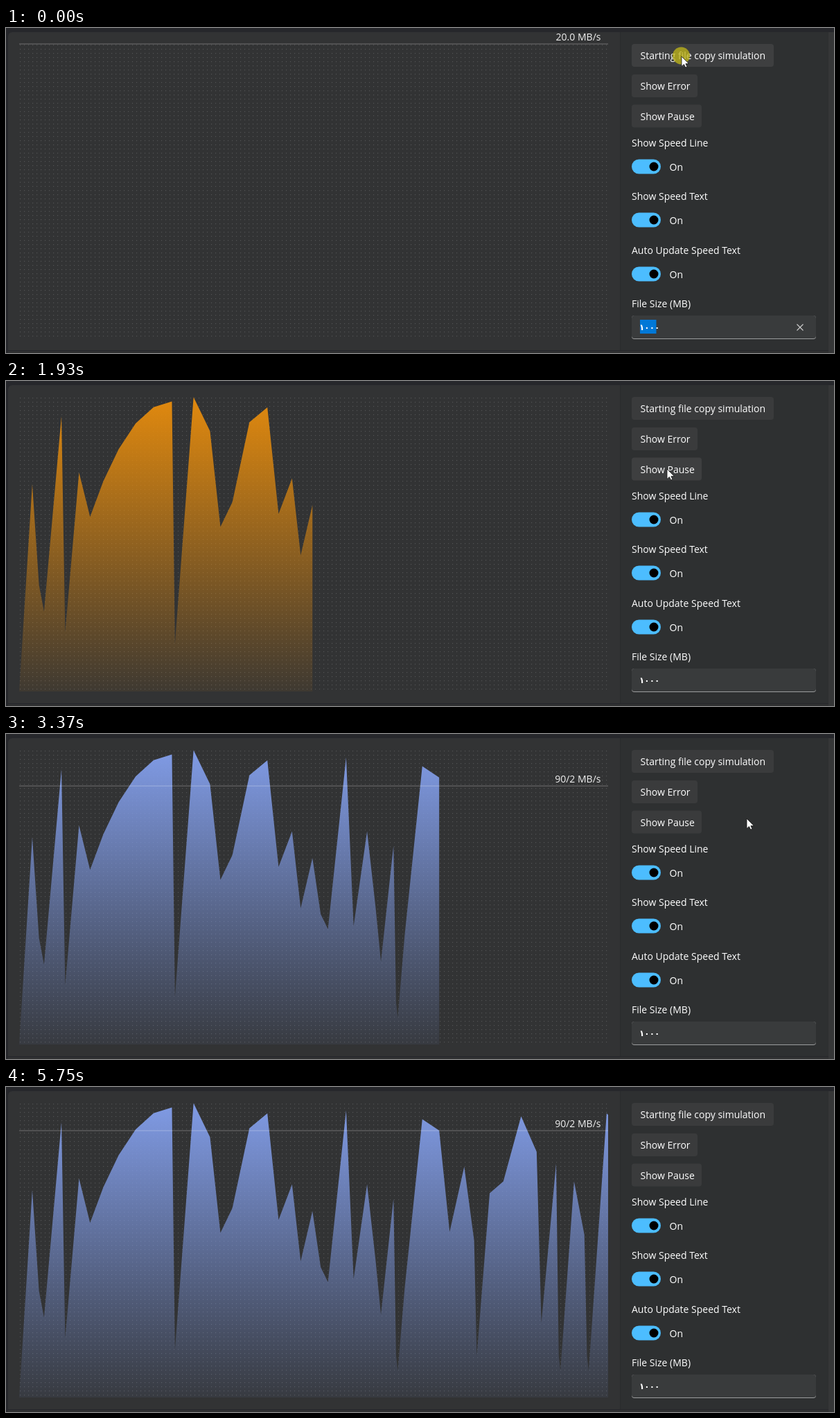
Animation of 1195x469 px, one loop 5.88 s. Source, as an HTML page with a canvas:

```html
<!DOCTYPE html>
<html lang="en">
<head>
<meta charset="utf-8">
<title>File copy speed graph</title>
<style>
  html, body { margin: 0; width: 100%; height: 100%; overflow: hidden; background: #26272b; }
  canvas { display: block; }
</style>
</head>
<body>
<canvas id="stage" width="1195" height="469"></canvas>
<script>
const ctx = document.getElementById('stage').getContext('2d');
const LOOP = 5880;
const LEFT = 19, RIGHT = 869, TOP = 23, BASE = 448;
const FONT = '14px "Open Sans", "Noto Sans", sans-serif';

const PX_PER_MB = 4.27;   // graph height of 1 MB/s
const PROGRESS = 0.27;    // graph width copied by one sample of 1 MB/s
const LINE_LAG = 55;
const ERROR_AT = 950, PAUSE_AT = 1680, RESUME_AT = 2800, POINTER_GONE = 3860;

const ramp = (t, start, length) => Math.min(1, Math.max(0, (t - start) / length));
const mix = (a, b, p) => a + (b - a) * p;
const climb = (from, to, steps) =>
  Array.from({ length: steps }, (_, i) => mix(from, to, Math.sin((i + 1) / steps * Math.PI / 2)));
const stall = [14, 9];

// Copy speeds in MB/s; the width of each step follows from its speed.
const speeds = [
  70, 36, 27, 93, 20, 74, 59, ...climb(59, 98, 5), 16, 99.5, 88, 55.6, 64, 91, 96, 60, 72, 46,
  63, 44, 39, 97, 40, 72, 46, 28, 67.1, ...stall, 37, 94, 90.2, 56, 78, 53, 14, 69, 73, 95, 83,
  25.2, 79, ...stall, 73, 55, ...stall, 96, 90.2
];

// Updates come every 70 ms, and less often after the sixteenth.
const arrival = n => 70 * n + 41.5 * Math.max(0, n - 16);

let reached = LEFT;
const points = speeds.map((speed, i) => {
  reached += speed * PROGRESS;
  return { x: reached, y: BASE - speed * PX_PER_MB, speed, time: arrival(i + 1) };
});

const running = [224, 66, 70], failed = [358, 73, 51], paused = [395, 88, 47];
const resumed = [584, 66, 70]; // running again, one turn round the hue circle

const stops = [
  { at: 0, x: 975, y: 41 },
  { at: 950, x: 954, y: 97 },
  { at: 1600, x: 954, y: 127 },
  { at: 2600, x: 949, y: 47 },
  { at: 3370, x: 1069, y: 122 },
  { at: 3700, x: 1091, y: 178 }
];
const clicks = [-60, ERROR_AT - 30, PAUSE_AT, RESUME_AT - 160];

function rect(x, y, w, h, color, radius = 0) {
  ctx.fillStyle = color;
  ctx.beginPath();
  ctx.roundRect(x, y, w, h, radius);
  ctx.fill();
}

function disc(x, y, r, color) {
  ctx.fillStyle = color;
  ctx.beginPath();
  ctx.arc(x, y, r, 0, Math.PI * 2);
  ctx.fill();
}

function text(str, x, middle, color = '#fff', align = 'left', font = FONT) {
  ctx.font = font;
  ctx.textAlign = align;
  ctx.fillStyle = color;
  ctx.fillText(str, x, middle + 5);
}

function graphColor(t) {
  let color = running;
  const fadeTo = (next, at) => {
    const p = ramp(t, at, 240) ** 2;
    color = color.map((v, i) => mix(v, next[i], p));
  };
  fadeTo(failed, ERROR_AT);
  fadeTo(paused, PAUSE_AT);
  fadeTo(resumed, RESUME_AT);
  return color;
}

function pointerAt(t) {
  let { x, y } = stops[0];
  for (const stop of stops.slice(1)) {
    const p = ramp(t, stop.at - 330, 330);
    const eased = p * p * (3 - 2 * p);
    x = mix(x, stop.x, eased);
    y = mix(y, stop.y, eased);
  }
  return { x, y };
}

function drawWindow() {
  rect(0, 0, 1195, 469, '#26272b');
  rect(3, 6, 1184, 459, '#323334', [6, 0, 0, 0]);
  rect(887, 6, 300, 459, '#2e3031');
  rect(886, 6, 1, 459, '#2a2b2c');
  rect(1187, 6, 8, 463, '#353637');
  rect(3, 466, 1184, 3, '#2f3031');
  ctx.fillStyle = 'rgba(255,255,255,.16)';
  for (let y = 24; y < 446; y += 6)
    for (let x = 20; x < 868; x += 6) ctx.fillRect(x, y, 1.2, 1.2);
}

function drawGraph(t) {
  const shown = points.filter(p => p.time <= t);
  if (!shown.length) return;
  const [h, s, l] = graphColor(t);
  const fill = ctx.createLinearGradient(0, TOP, 0, BASE);
  fill.addColorStop(0, `hsla(${h % 360},${s}%,${l}%,1)`);
  fill.addColorStop(1, `hsla(${h % 360},${s}%,${l}%,.07)`);
  ctx.save();
  ctx.beginPath();
  ctx.rect(LEFT, TOP - 1, RIGHT - LEFT, BASE - TOP + 1);
  ctx.clip();
  ctx.beginPath();
  ctx.moveTo(LEFT, BASE);
  shown.forEach(p => ctx.lineTo(p.x, p.y));
  ctx.lineTo(shown[shown.length - 1].x, BASE);
  ctx.fillStyle = fill;
  ctx.fill();
  ctx.restore();
}

// The speed line chases each new sample with an exponential ease.
function drawSpeedLine(t) {
  let y = TOP, label = '20.0 MB/s';
  points.forEach((p, i) => {
    if (p.time > t) return;
    const next = points[i + 1];
    const until = next ? Math.min(t, next.time) : t;
    y = mix(p.y, y, Math.exp((p.time - until) / LINE_LAG));
    label = p.speed.toFixed(1).replace('.', '/') + ' MB/s';
  });
  ctx.globalAlpha = Math.max(1 - ramp(t, ERROR_AT + 50, 215), ramp(t, RESUME_AT, 250));
  rect(LEFT, Math.round(y) - 0.5, RIGHT - LEFT, 1, 'rgba(255,255,255,.3)');
  text(label, 858.5, y - 10, '#f0f0f0', 'right');
  ctx.globalAlpha = 1;
}

function button(label, y, width, pointer) {
  const hover = pointer.x < 903 + width && pointer.y > y && pointer.y < y + 33;
  rect(903, y, width, 33, hover ? '#3e3f40' : '#3a3b3c', 4);
  text(label, 915.5, y + 17.3);
}

function toggle(label, y) {
  text(label, 903, y);
  rect(903, y + 23.5, 42, 21, '#4cbdff', 10.5);
  disc(935, y + 34, 6.5, '#000');
  text('On', 957.5, y + 35);
}

function drawField(focused) {
  text('File Size (MB)', 903, 398);
  rect(903, 415, 266, 34, '#9b9c9d', 4);
  rect(903, 415, 266, 33, '#393b3c', 4);
  if (focused) {
    rect(915, 421, 23.5, 20, '#0078d7');
    ctx.strokeStyle = '#cfcfcf';
    ctx.lineWidth = 1.1;
    ctx.beginPath();
    for (const side of [-4.5, 4.5]) {
      ctx.moveTo(1146 + side, 427.5);
      ctx.lineTo(1146 - side, 436.5);
    }
    ctx.stroke();
  }
  text('۱۰۰۰', 914, 431, '#fff', 'left', 'bold 12px "DejaVu Sans", sans-serif');
}

function drawControls(t, pointer) {
  button('Starting file copy simulation', 23, 205, pointer);
  button('Show Error', 67, 95, pointer);
  button('Show Pause', 110.5, 101, pointer);
  toggle('Show Speed Line', 166);
  toggle('Show Speed Text', 243);
  toggle('Auto Update Speed Text', 321);
  drawField(t < 70);
}

function drawPointer(t, { x, y }) {
  if (t > POINTER_GONE) return;
  const click = clicks.find(c => t >= c && t < c + 200);
  if (click !== undefined) {
    const fade = 1 - ramp(t, click + 80, 120);
    disc(x - 0.5, y - 1, 12.5, `rgba(190,180,25,${0.78 * fade})`);
  }
  const arrow = new Path2D('M0 0V14.5L3.4 11.4 5.7 16 8 15 5.9 10.6H10.5Z');
  ctx.save();
  ctx.translate(x, y);
  ctx.fillStyle = '#fff';
  ctx.strokeStyle = 'rgba(20,20,20,.8)';
  ctx.lineWidth = 1;
  ctx.fill(arrow);
  ctx.stroke(arrow);
  ctx.restore();
}

function render(t) {
  const pointer = pointerAt(t);
  drawWindow();
  drawGraph(t);
  drawSpeedLine(t);
  drawControls(t, pointer);
  drawPointer(t, pointer);
}

const start = performance.now();
function frame() {
  render((performance.now() - start) % LOOP);
  requestAnimationFrame(frame);
}
frame();
</script>
</body>
</html>
```
